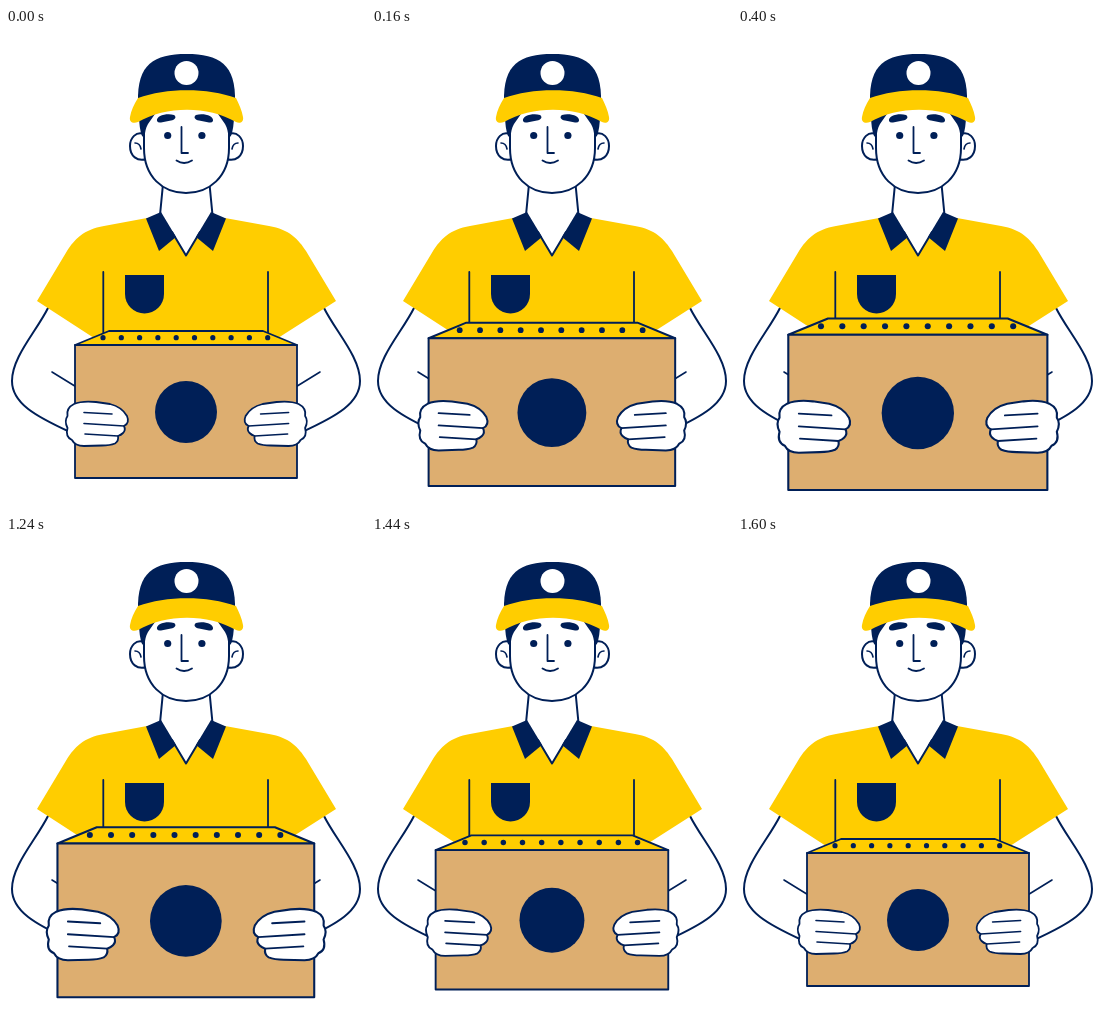
An HTML page with a canvas that plays this animation: 360x480 px, repeating every 1.64 s.

```html
<!DOCTYPE html>
<html lang="en">
<head>
<meta charset="utf-8">
<title>Courier with parcel</title>
<style>
html, body { margin: 0; width: 100%; height: 100%; overflow: hidden; background: #fff; }
canvas { display: block; width: 360px; height: 480px; }
</style>
</head>
<body>
<canvas id="stage"></canvas>
<script>
const W = 360, H = 480, LOOP = 1640, STEP = 40;
const NAVY = '#001f57', YELLOW = '#ffcd00', CARD = '#ddae70', WHITE = '#fff';
const canvas = document.getElementById('stage');
const ctx = canvas.getContext('2d');
const dpr = window.devicePixelRatio || 1;
canvas.width = W * dpr;
canvas.height = H * dpr;

function shape(d, fill, line, width = 2) {
  const path = new Path2D(d);
  if (fill) {
    ctx.fillStyle = fill;
    ctx.fill(path);
  }
  if (line) {
    ctx.strokeStyle = line;
    ctx.lineWidth = width;
    ctx.stroke(path);
  }
}

const stroke = (d, width) => shape(d, null, NAVY, width);

function dot(x, y, r, color) {
  ctx.fillStyle = color;
  ctx.beginPath();
  ctx.arc(x, y, r, 0, Math.PI * 2);
  ctx.fill();
}

// Draws a part on the left and again mirrored on the right.
function both(part, axis = 180) {
  part();
  ctx.save();
  ctx.translate(axis * 2, 0);
  ctx.scale(-1, 1);
  part();
  ctx.restore();
}

function drawArm() {
  stroke('M42 280C30 304 6 329 6 353C6 375 29 388 64 404');
  stroke('M46 344L72 360', 1.6);
}

function drawShirt() {
  shape('M141 190L98 198C78 201 68 212 61 223L31 273L88 310H272L330 273L300 223C293 212 283 201 263 198L219 190Z', YELLOW);
  stroke('M97.3 244V312M262 244V312', 1.8);
  shape('M119 247H158V266A19.5 19.5 0 0 1 119 266Z', NAVY);
  shape('M155 185L180 228L205 185Z', WHITE);
  stroke('M166 204L180 227.5L194 204');
}

function drawHead() {
  shape('M158 150L154 187L180 195L207 187L203 150Z', WHITE);
  stroke('M157 156L154 187M203.5 156L206.5 187');
  both(() => shape('M140 190.5L155 184L170 209L153 223Z', NAVY));
  both(() => {
    shape('M138 106C130 103 124 110 124 118C124 128 131 134 141 131', WHITE, NAVY);
    stroke('M129 115Q134 115 135 121', 1.6);
  }, 180.5);
  shape('M138 96V120C138 149 157 165 180 165C203 165 223 149 223 120V96', WHITE, NAVY);
  both(() => shape('M133 86H149L142 96Q139 101 138.5 110L136 108Q133 100 133 86Z', NAVY), 180.5);

  both(() => shape('M151 93C150 88 160 85 168 87C171 89 169 92 165 92.5L155 94.5Q152 95 151 93Z', NAVY), 179);
  both(() => dot(161.7, 107.5, 3.6, NAVY), 178.8);
  stroke('M175.5 99V125H182', 1.8);
  stroke('M170.5 132.5Q178 137.5 186 132.5', 1.8);

  shape('M132 74C131 36 148 26 180.5 26C213 26 230 36 229 74Z', NAVY);
  shape('M132 70C160 59.5 202 59.5 230 70C233 76 236 83 237 89C238 94 234 96 230 94C202 77.5 160 77.5 132 94C127 96 123 94 124 89C125 83 128 76 132 70Z', YELLOW);
  dot(180.5, 45, 12, WHITE);
}

function drawHand() {
  shape('M68 376Q76 372.5 90 374L104 376Q116 379 121 388Q124 395 118 398' +
    'Q120 402 117 405Q115 407 112 408Q113 413 109 415.5Q104 417.5 96 417.5' +
    'L78 418Q69 418 66 412Q59 409 61.5 400Q58 393 61.5 388Q60 380 68 376Z', WHITE, NAVY, 1.8);
  stroke('M106 386L78 384.5M118 398L78 395.5M112 408L79 406', 1.6);
}

function drawParcel(scale) {
  ctx.save();
  ctx.translate(181, 378);
  ctx.scale(scale, scale);
  ctx.translate(-181, -378);
  shape('M69 317L103 303H257L291 317Z', YELLOW, NAVY, 1.8);
  for (let i = 0; i < 10; i++) dot(97 + i * 18.3, 309.7, 2.6, NAVY);
  shape('M69 317H291V450H69Z', CARD, NAVY, 1.8);
  dot(180, 384, 31, NAVY);
  both(drawHand, 180.3);
  ctx.restore();
}

// Swing from 0 to 1 with a soft start and a soft end.
const ease = (u, start, end) => 1 - (1 - u ** start) ** end;

function reach(time) {
  const t = Math.floor(time / STEP) * STEP;
  if (t < 400) return ease(t / 400, 1.3, 3);
  if (t <= 1200) return 1;
  return 1 - ease(Math.min(1, (t - 1200) / 400), 1.5, 2);
}

function draw(now) {
  ctx.setTransform(dpr, 0, 0, dpr, 0, 0);
  ctx.fillStyle = WHITE;
  ctx.fillRect(0, 0, W, H);
  ctx.lineCap = 'round';
  ctx.lineJoin = 'round';
  both(drawArm);
  drawShirt();
  drawHead();
  drawParcel(1 + 0.167 * reach(now % LOOP));
}

const start = performance.now();
function tick() {
  draw(performance.now() - start);
  requestAnimationFrame(tick);
}
tick();
</script>
</body>
</html>
```
